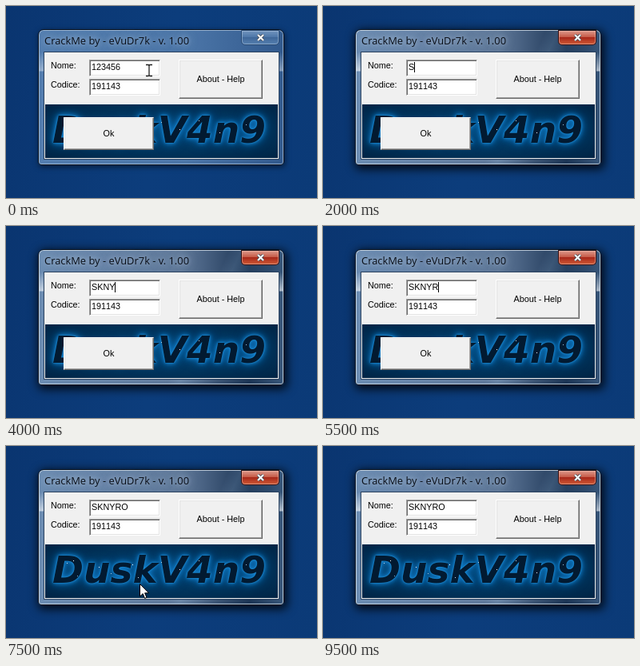
These frames come from a looping animation (389 by 240 pixels, 10000 ms). An HTML page:

```html
<!DOCTYPE html>
<html lang="it">
<head>
<meta charset="utf-8">
<title>CrackMe</title>
<style>
html, body { margin: 0; width: 100%; height: 100%; overflow: hidden; }
body {
  position: relative;
  background: linear-gradient(100deg, #0a3570, #0c3d7c 50%, #0b3a77);
  font: 10.8px/13px "Liberation Sans", Arial, sans-serif;
  font-kerning: none;
  color: #000;
  white-space: pre;
  cursor: default;
}
div, svg { position: absolute; box-sizing: border-box; }
.hidden { display: none !important; }

#window {
  left: 40px; top: 29px; width: 308px; height: 170px;
  border: 1px solid #0a1422; border-radius: 7px 7px 4px 4px;
  background:
    linear-gradient(#fff0 28px, #fff9 51px, #fff0 52px),
    linear-gradient(115deg, #fff0 62%, #9cc4e428 66%, #fff0 78%),
    linear-gradient(90deg, #6c8db3, #60799a 58%, #1b3454 86%, #38577b);
  box-shadow: inset 0 0 0 1px #d3e1eed0, 2px 3px 12px 2px #000c;
}
#window.idle {
  background:
    linear-gradient(#fff0 28px, #fff6 51px, #fff0 52px),
    linear-gradient(90deg, #547eb0, #4c76a8 60%, #31598d);
  box-shadow: inset 0 0 0 1px #b9d0e8b0, 1px 2px 7px #0008;
}
#title {
  left: 48px; top: 33px;
  font: 12.9px/20px "Open Sans", sans-serif;
  color: #0a0f18;
  text-shadow: 0 0 6px #d9e8f8a0, 0 0 12px #d9e8f880;
}
#close {
  left: 294px; top: 30px; width: 48px; height: 19px;
  border: 1px solid #3c1010; border-top-color: #1c1520; border-radius: 0 0 5px 5px;
  background: linear-gradient(#dd9a8c, #c65a47 46%, #a8281a 50%, #cf5a36);
  box-shadow: inset 0 0 0 1px #f0b8a890;
}
#close.idle {
  border-color: #284a74;
  background: linear-gradient(#7294bd, #4c76a8 48%, #3f6799 50%, #5680b0);
  box-shadow: inset 0 0 0 1px #b5cbe480;
}
#client { left: 47px; top: 57px; width: 295px; height: 135px; background: #f0f0f0; border: 1px solid #2a4260; }
#banner {
  left: 49px; top: 123px; width: 291px; height: 67px; overflow: hidden;
  background: radial-gradient(ellipse at center, #044372, #013157 65%, #002445);
}
#word {
  left: 9px; top: 2px;
  font: italic bold 47px/60px "DejaVu Sans", sans-serif;
  color: #021a31;
  text-shadow: 0 0 2px #259be5, 0 0 5px #1787d4, 0 0 9px #0c6fb8, 0 0 14px #0b65a8;
}
#specks {
  left: 0; top: 1px; width: 1px; height: 1px;
  box-shadow: 27px 22px #cfe4f2, 35px 19px #fff, 40px 38px #8fb9d6, 67px 27px #fff,
    82px 35px #a9cce2, 109px 24px #fff, 116px 40px #cfe4f2, 145px 21px #b9d7e8,
    168px 30px #fff, 192px 19px #cfe4f2, 218px 34px #fff, 251px 24px #a9cce2;
}
.button {
  display: flex; align-items: center; justify-content: center;
  background: #f0f0f0; border: 1px solid; border-color: #fff #696969 #696969 #fff;
  box-shadow: inset -1px -1px #a0a0a0, inset 1px 1px #e3e3e3;
}
.edit {
  left: 104px; width: 89px; height: 21px;
  background: #fff; border: 1px solid; border-color: #a0a0a0 #fff #fff #a0a0a0;
  box-shadow: inset 1px 1px #696969, inset -1px -1px #e3e3e3;
}
.label { left: 56px; }
.value { left: 107px; height: 13px; }
.selected { background: #39f; color: #fff; }
#caret { top: 70px; width: 1px; height: 13px; }
</style>
</head>
<body>
<div id="window"></div>
<div id="title">CrackMe by - eVuDr7k - v. 1.00</div>
<div id="close"><svg style="left:18px;top:4px" width="11" height="9"><path d="M2 1 9 8M9 1 2 8" stroke="#3a4350" stroke-width="3.6"/><path d="M2 1 9 8M9 1 2 8" stroke="#fff" stroke-width="2.2"/></svg></div>
<div id="client"></div>
<div class="label" style="top:68px">Nome:</div>
<div class="label" style="top:92px">Codice:</div>
<div class="edit" style="top:67px"></div>
<div class="edit" style="top:91px"></div>
<div id="name" class="value" style="top:70px"></div>
<div class="value" style="top:94px">191143</div>
<div id="caret"></div>
<div class="button" style="left:216px;top:67px;width:105px;height:49px">About - Help</div>
<div id="banner"><div id="word">DuskV4n9</div><div id="specks"></div></div>
<div id="ok" class="button" style="left:72px;top:139px;width:113px;height:41px">Ok</div>
<svg id="beam" style="left:174px;top:72px" width="10" height="17">
  <path d="M1 1.5H4L5 2.5 6 1.5H9M5 2.5V14.5M1 15.5H4L5 14.5 6 15.5H9" fill="none" stroke="#222" stroke-width="1.3"/>
</svg>
<svg id="arrow" width="13" height="20">
  <path d="M.5 .5V16L4.2 12.6 6.6 18.4 9 17.4 6.6 11.8H11.6Z" fill="#fff" stroke="#000"/>
</svg>
<script>
const $ = id => document.getElementById(id);
const show = (id, on) => $(id).classList.toggle("hidden", !on);

const STEP = 500, STEPS = 20;
const typedName = "SKNYRO";
const keySteps = [4, 5, 7, 8, 11, 12];
const caretSteps = [2, 4, 5, 7, 8, 10, 11, 12, 14];
const caretStops = [107, 114, 121, 129, 136, 144, 152];

function arrowAt(step) {
  if (step === 14) return [155, 172];
  if (step >= 15 && step <= 17) return [167, 172];
  return step === 18 ? [168, 171] : null;
}

function draw(step) {
  const idle = step === 0;
  const selected = step >= 1 && step <= 3;
  const typed = keySteps.filter(s => s <= step).length;
  const arrow = arrowAt(step);

  $("window").classList.toggle("idle", idle);
  $("close").classList.toggle("idle", idle);
  show("beam", idle);

  $("name").textContent = typed ? typedName.slice(0, typed) : "123456";
  $("name").classList.toggle("selected", selected);
  show("caret", caretSteps.includes(step));
  $("caret").style.left = caretStops[typed] + "px";
  $("caret").style.background = selected ? "#c60" : "#000";

  show("ok", step < 15);
  show("arrow", arrow);
  if (arrow) [$("arrow").style.left, $("arrow").style.top] = arrow.map(v => v + "px");
}

const start = performance.now();
let shown = -1;
function tick() {
  const step = Math.floor((performance.now() - start) / STEP) % STEPS;
  if (step !== shown) draw(shown = step);
  requestAnimationFrame(tick);
}
tick();
</script>
</body>
</html>
```
